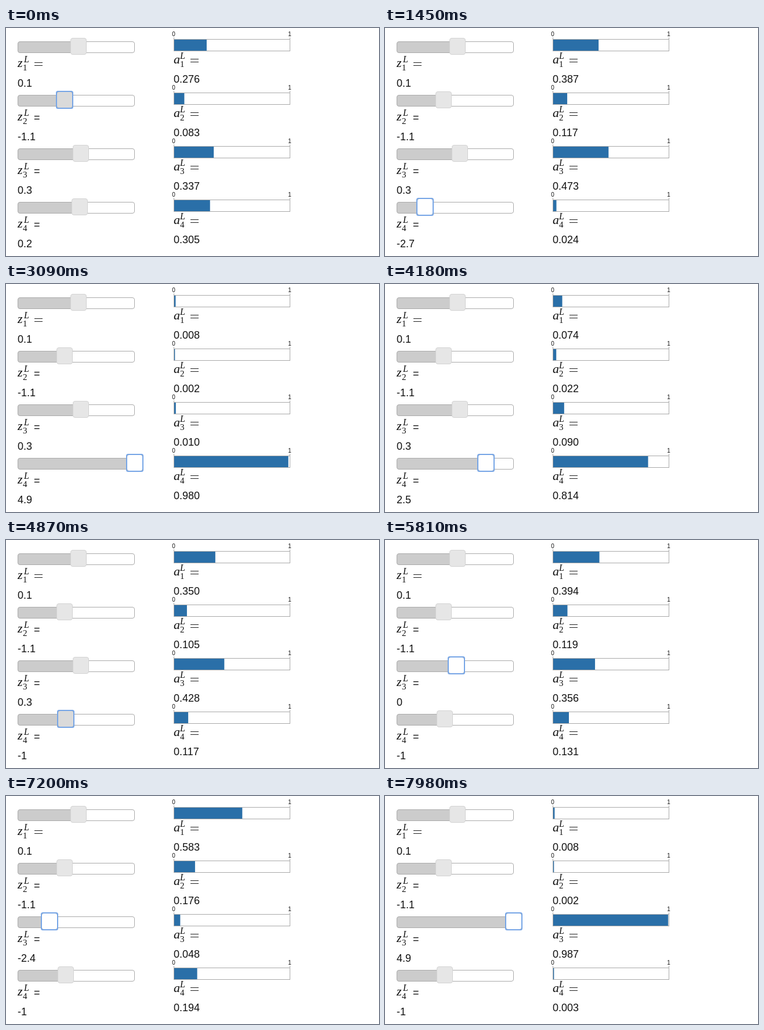
An HTML page with a canvas for the animation above (8 s loop, 643 by 392 pixels).

```html
<!DOCTYPE html>
<html lang="en">
<head>
<meta charset="utf-8">
<title>Softmax sliders</title>
<style>
  html, body { margin: 0; width: 100%; height: 100%; overflow: hidden; background: #fff; }
  canvas { display: block; }
</style>
</head>
<body>
<canvas id="stage" width="643" height="392"></canvas>
<script>
const ctx = document.getElementById('stage').getContext('2d');
const LOOP = 8000, ROW = 92;
const SANS = '"Liberation Sans", Arial, sans-serif';
const SERIF = '"Liberation Serif", "Times New Roman", serif';

// Evenly timed drags; the slider takes one value per step.
const drags = [
  { row: 3, from: 990, to: 1770, values: [-0.2, -0.7, -1.2, -1.7, -2.2, -2.7, -3.2, -3.8, -4.3, -4.7, -5] },
  { row: 3, from: 2230, to: 3010, values: [-4.7, -4.2, -3.5, -2.6, -1.4, 0, 1.4, 2.6, 3.6, 4.3, 4.7] },
  { row: 3, from: 3090, to: 3090, values: [4.9] },
  { row: 3, from: 3950, to: 4560, values: [4.6, 4.1, 3.4, 2.5, 1.5, 0.6, -0.1, -0.6, -0.8] },
  { row: 3, from: 4790, to: 4790, values: [-1] },
  { row: 2, from: 5810, to: 6500, values: [0, -0.5, -1.1, -1.8, -2.5, -3.1, -3.7, -4.3, -4.8, -5] },
  { row: 2, from: 6880, to: 7670, values: [-4.8, -4.4, -3.9, -3.2, -2.4, -1.4, -0.3, 0.8, 1.9, 2.8, 3.6] },
  { row: 2, from: 7750, to: 7980, values: [4.2, 4.6, 4.8, 4.9] }
];

const looks = {
  idle: ['#e6e6e6', '#d3d3d3'],
  hover: ['#dadada', '#aaaaaa'],
  active: ['#ffffff', '#aaaaaa']
};

function inputsAt(t) {
  const z = [0.1, -1.1, 0.3, 0.2];
  for (const { row, from, to, values } of drags) {
    if (t < from) continue;
    const last = values.length - 1;
    const gap = last ? (to - from) / last : 1;
    // Step times fall on a 10 ms clock.
    const step = Math.min(last, Math.floor((t - from + 5) / gap));
    z[row] = values[step];
  }
  return z;
}

function pointerAt(t) {
  if (t < 300) return { focus: 1 };
  if (t < 760) return { focus: 1, hover: 3 };
  if (t < 4870) return { focus: 3, active: 3 };
  if (t < 5340) return { focus: 3 };
  if (t < 5640) return { focus: 3, hover: 2 };
  return { focus: 2, active: 2 };
}

function softmax(z) {
  const powers = z.map(Math.exp);
  const sum = powers.reduce((a, b) => a + b);
  return powers.map(p => p / sum);
}

function text(str, x, y, font, align = 'left') {
  ctx.font = font;
  ctx.textAlign = align;
  ctx.fillStyle = '#111';
  ctx.fillText(str, x, y);
}

function roundBox(x, y, w, h, r) {
  ctx.beginPath();
  ctx.roundRect(x, y, w, h, r);
}

function rect(x, y, w, h, color) {
  ctx.fillStyle = color;
  ctx.fillRect(x, y, w, h);
}

function symbol(letter, index, x, y) {
  text(letter, x, y, `italic 22px ${SERIF}`);
  text('L', x + 11, y - 8, `italic 16px ${SERIF}`);
  text(index, x + (letter === 'z' ? 9 : 11), y + 6, `15px ${SERIF}`);
}

function wideEquals(x, y) {
  rect(x, y - 8, 14, 1, '#222');
  rect(x, y - 3, 14, 1, '#222');
}

function slider(value, top, look, focused) {
  const x = Math.round(109.18 + 20.2 * value), y = top + 17;
  const [fill, border] = looks[look];
  ctx.lineWidth = 1;

  roundBox(20.5, top + 23.5, 201, 19, 3.5);
  ctx.fillStyle = '#fff';
  ctx.fill();
  ctx.save();
  ctx.clip();
  rect(20, top + 23, x - 6, 20, '#cccccc');
  ctx.restore();
  ctx.strokeStyle = '#aaaaaa';
  ctx.stroke();

  roundBox(x + 0.5, y + 0.5, 27, 28, 3.5);
  ctx.fillStyle = fill;
  ctx.fill();
  ctx.strokeStyle = border;
  ctx.stroke();

  if (focused) {
    roundBox(x, y, 28, 29, 2.5);
    ctx.lineWidth = 2;
    ctx.strokeStyle = '#76a5e6';
    ctx.stroke();
  }
}

function bar(share, top) {
  ctx.lineWidth = 1;
  ctx.strokeStyle = '#aaaaaa';
  ctx.strokeRect(289.5, top + 19.5, 200, 20);
  rect(290, top + 20, 0.8 + 200 * share, 19, '#2a6fa8');
  for (const end of [0, 1]) {
    const x = 289 + 200 * end;
    rect(x, top + 16, 1, 3, '#aaaaaa');
    text(end, x, top + 14, `10px ${SANS}`, 'center');
  }
}

function draw(t) {
  rect(0, 0, 643, 392, '#fff');
  const z = inputsAt(t), a = softmax(z);
  const { focus, hover, active } = pointerAt(t);

  for (let i = 0; i < 4; i++) {
    const top = i * ROW;
    const look = i === active ? 'active' : i === focus || i === hover ? 'hover' : 'idle';

    slider(z[i], top, look, i === focus);
    symbol('z', i + 1, 20, top + 67);
    if (i === 0) wideEquals(49, top + 67);
    else text('=', 48, top + 68, `18px ${SANS}`);
    text(String(z[i]), 20, top + 101, `18px ${SANS}`);

    bar(a[i], top);
    symbol('a', i + 1, 289, top + 61);
    wideEquals(318, top + 61);
    text(a[i].toFixed(3), 289, top + 94, `18px ${SANS}`);
  }
}

const start = performance.now();
function frame() {
  draw((performance.now() - start) % LOOP);
  requestAnimationFrame(frame);
}
frame();
</script>
</body>
</html>
```
